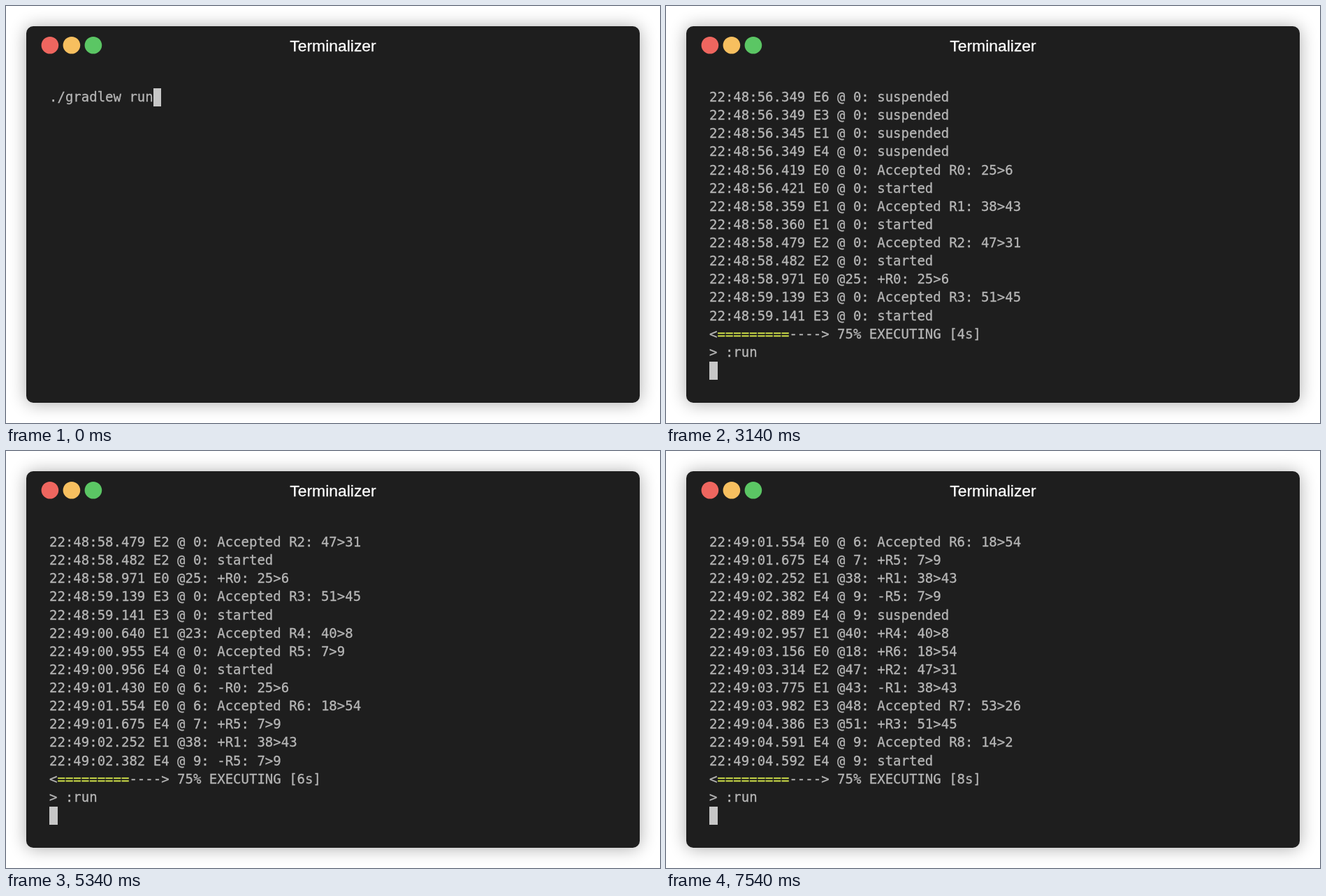
Write an HTML page that moves like this. It is 936 px wide and 598 px high and loops after 8 s.

```html
<!DOCTYPE html>
<html lang="en">
<head>
<meta charset="utf-8">
<title>Terminal</title>
<style>
html, body { margin: 0; width: 100%; height: 100%; overflow: hidden; background: #fff; }
.window {
  position: absolute; left: 29px; top: 29px; width: 878px; height: 540px;
  border-radius: 10px; background: #1e1e1e;
  box-shadow: 0 1px 24px rgba(0, 0, 0, .33);
}
svg { position: absolute; left: 0; top: 0; }
.title {
  position: absolute; left: 0; top: 43px; width: 936px; text-align: center; color: #fff;
  font: 22.9px/28px "Liberation Sans", Arial, sans-serif;
  -webkit-text-stroke: .3px #fff;
}
pre {
  position: absolute; left: 62px; top: 117px; margin: 0; color: #b6b6b6;
  font: 19px/26.13px "DejaVu Sans Mono", Menlo, monospace;
  -webkit-text-stroke: .3px;
}
pre span { color: #cfe04a; }
#cursor { position: absolute; width: 11.5px; height: 26px; background: #c7c7c7; }
</style>
</head>
<body>
<div class="window"></div>
<svg width="160" height="80">
  <circle cx="62.9" cy="56.2" r="12.3" fill="#ee665f"/>
  <circle cx="93.9" cy="56.2" r="12.3" fill="#f7bf5f"/>
  <circle cx="124.9" cy="56.2" r="12.3" fill="#5bc664"/>
</svg>
<div class="title">Terminalizer</div>
<pre id="screen"></pre>
<div id="cursor"></div>
<script>
const LOOP = 8000, ENTER = 1000, ROWS = 16, CELL_W = 11.44, CELL_H = 26.13;
const COMMAND = "./gradlew run";

const log = `22:48:56.349 E2 @ 0: suspended
22:48:56.349 E0 @ 0: suspended
22:48:56.349 E5 @ 0: suspended
22:48:56.349 E6 @ 0: suspended
22:48:56.349 E3 @ 0: suspended
22:48:56.345 E1 @ 0: suspended
22:48:56.349 E4 @ 0: suspended
22:48:56.419 E0 @ 0: Accepted R0: 25>6
22:48:56.421 E0 @ 0: started
22:48:58.359 E1 @ 0: Accepted R1: 38>43
22:48:58.360 E1 @ 0: started
22:48:58.479 E2 @ 0: Accepted R2: 47>31
22:48:58.482 E2 @ 0: started
22:48:58.971 E0 @25: +R0: 25>6
22:48:59.139 E3 @ 0: Accepted R3: 51>45
22:48:59.141 E3 @ 0: started
22:49:00.640 E1 @23: Accepted R4: 40>8
22:49:00.955 E4 @ 0: Accepted R5: 7>9
22:49:00.956 E4 @ 0: started
22:49:01.430 E0 @ 6: -R0: 25>6
22:49:01.554 E0 @ 6: Accepted R6: 18>54
22:49:01.675 E4 @ 7: +R5: 7>9
22:49:02.252 E1 @38: +R1: 38>43
22:49:02.382 E4 @ 9: -R5: 7>9
22:49:02.889 E4 @ 9: suspended
22:49:02.957 E1 @40: +R4: 40>8
22:49:03.156 E0 @18: +R6: 18>54
22:49:03.314 E2 @47: +R2: 47>31
22:49:03.775 E1 @43: -R1: 38>43
22:49:03.982 E3 @48: Accepted R7: 53>26
22:49:04.386 E3 @51: +R3: 51>45
22:49:04.591 E4 @ 9: Accepted R8: 14>2
22:49:04.592 E4 @ 9: started`.split("\n");

// The terminal repaints every 100 ms; each line's own timestamp says when it appears.
const refresh = ms => Math.floor((ms - 40) / 100);
const stamp = line => Date.parse(`2000-01-01T${line.slice(0, 12)}Z`);
const clockStart = stamp("22:48:56.995");
const due = log.map(line => refresh(stamp(line) - clockStart));

const screen = document.getElementById("screen");
const cursor = document.getElementById("cursor");

function placeCursor(col, row) {
  cursor.style.left = 62 + col * CELL_W + "px";
  cursor.style.top = Math.round(118 + row * CELL_H) + "px";
}

function showPrompt() {
  screen.textContent = COMMAND;
  placeCursor(COMMAND.length, 0);
}

function showRun(count, seconds) {
  // Three rows stay free for the progress bar, the task and the cursor.
  const lines = [COMMAND, "", "> Task :run", ...log.slice(0, count)].slice(3 - ROWS);
  const bar = document.createElement("span");
  bar.textContent = "=".repeat(9);
  screen.replaceChildren(
    lines.join("\n") + "\n<", bar, `----> 75% EXECUTING [${seconds}s]\n> :run`
  );
  placeCursor(0, lines.length + 2);
}

const origin = performance.now();
let shown;

function tick() {
  const t = (performance.now() - origin) % LOOP;
  const running = t >= ENTER;
  const count = due.filter(at => at <= refresh(t)).length;
  const seconds = 1 + Math.floor((t - 140) / 1000);
  const state = running ? `${count} ${seconds}` : "prompt";
  if (state !== shown) {
    shown = state;
    running ? showRun(count, seconds) : showPrompt();
  }
  requestAnimationFrame(tick);
}
tick();
</script>
</body>
</html>
```
